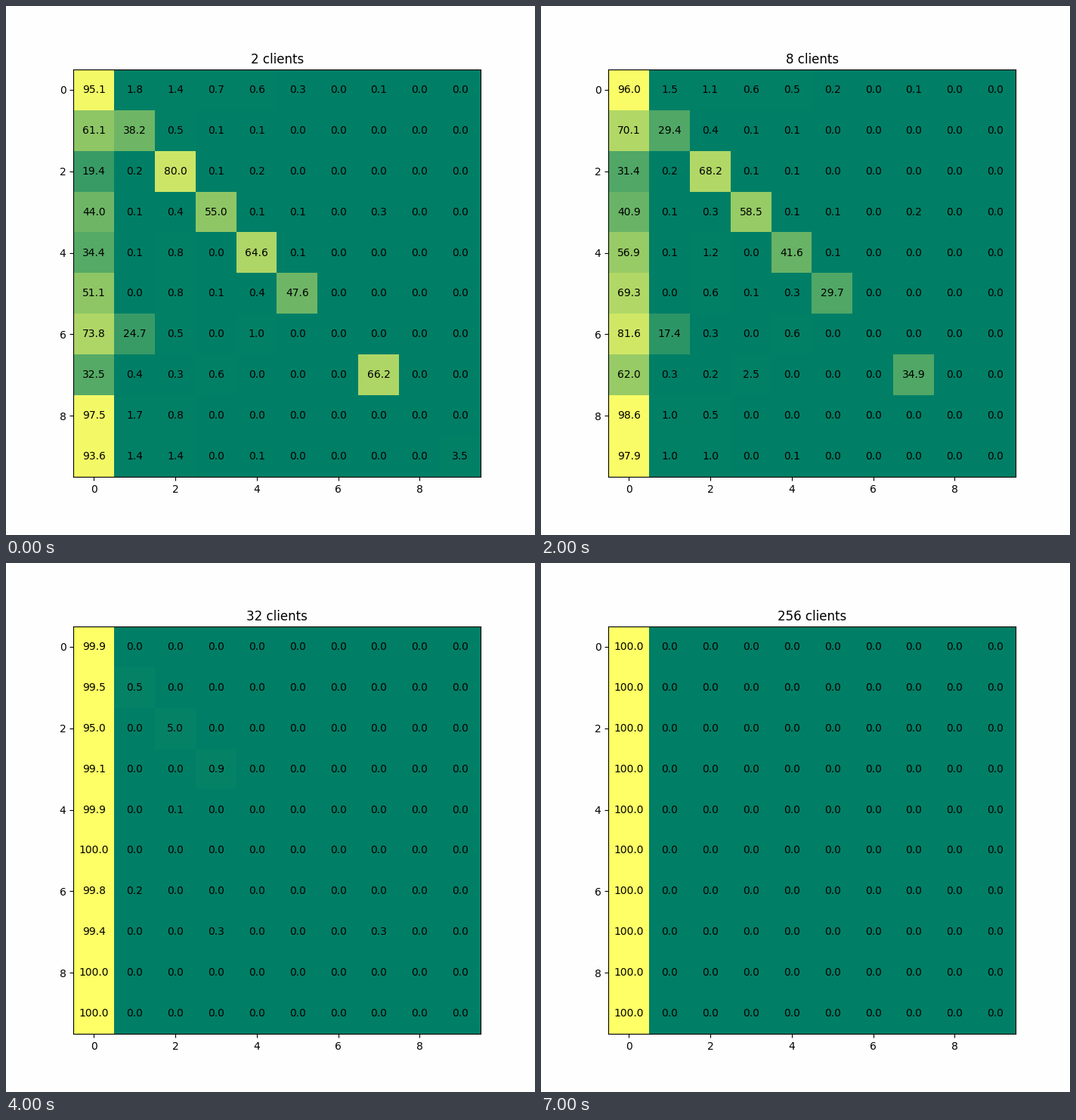
Write a matplotlib script that moves like this. It is 700x700 px and loops after 8 s.

```python
import numpy as np
import matplotlib.pyplot as plt
from matplotlib.animation import FuncAnimation

N, STEPS = 10, 8

# Main cells (row, column): percent at 2, 4, 8, 16, ... clients, then zero.
hits = {
    (1, 1): [38.2, 24.8, 29.4, 21.4, 0.5],
    (2, 2): [80.0, 71.4, 68.2, 57.1, 5.0],
    (3, 3): [55.0, 57.1, 58.5, 49.6, 0.9],
    (4, 4): [64.6, 58.1, 41.6, 25.1],
    (5, 5): [47.6, 44.6, 29.7, 11.9],
    (6, 1): [24.7, 12.7, 17.4, 11.7, 0.2],
    (7, 7): [66.2, 44.3, 34.9, 25.6, 0.3],
    (7, 3): [0.6, 1.8, 2.5, 2.5, 0.3],
    (9, 9): [3.5],
}

# Small errors per row: change per step, then first values from column 1 on.
leaks = [
    (0.90, [1.8, 1.4, 0.7, 0.6, 0.3, 0, 0.1]),
    (0.85, [0, 0.5, 0.1, 0.1]),
    (0.80, [0.24, 0, 0.14, 0.22]),
    (0.80, [0.1, 0.4, 0, 0.1, 0.1, 0, 0.3]),
    (1.22, [0.1, 0.8, 0, 0, 0.1]),
    (0.88, [0, 0.8, 0.1, 0.4]),
    (0.80, [0, 0.5, 0, 1.0]),
    (0.90, [0.4, 0.3]),
    (0.75, [1.7, 0.8]),
    (0.85, [1.4, 1.4, 0, 0.1]),
]

# Cells between two limits share one colour.
limits = [0.45, 12, 18, 25, 36, 50.5, 62.5, 77, 87.5]


def matrix(step):
    m = np.zeros((N, N))
    fade = 1 if step < 4 else 0.03 if step == 4 else 0
    for r, (rate, start) in enumerate(leaks):
        m[r, 1:len(start) + 1] = np.array(start) * rate ** step * fade
    for cell, values in hits.items():
        if step < len(values):
            m[cell] = values[step]
    m[:, 0] = 100 - m.sum(axis=1)
    return m


def shade(m):
    group = np.digitize(m, limits)
    out = m.copy()
    for g in np.unique(group):
        out[group == g] = m[group == g].mean()
    return out


fig, ax = plt.subplots(figsize=(7, 7), dpi=100, facecolor="#fefefe")
image = ax.imshow(np.zeros((N, N)), cmap="summer", vmin=0, vmax=100)
title = ax.set_title("")
labels = [ax.text(c, r, "", ha="center", va="center")
          for r in range(N) for c in range(N)]


def draw(step):
    m = matrix(step)
    image.set_data(shade(m))
    title.set_text(f"{2 ** (step + 1)} clients")
    for label, value in zip(labels, m.flat):
        label.set_text(f"{value:.1f}")


anim = FuncAnimation(fig, draw, frames=STEPS, interval=1000, repeat=True)
plt.show()
```
